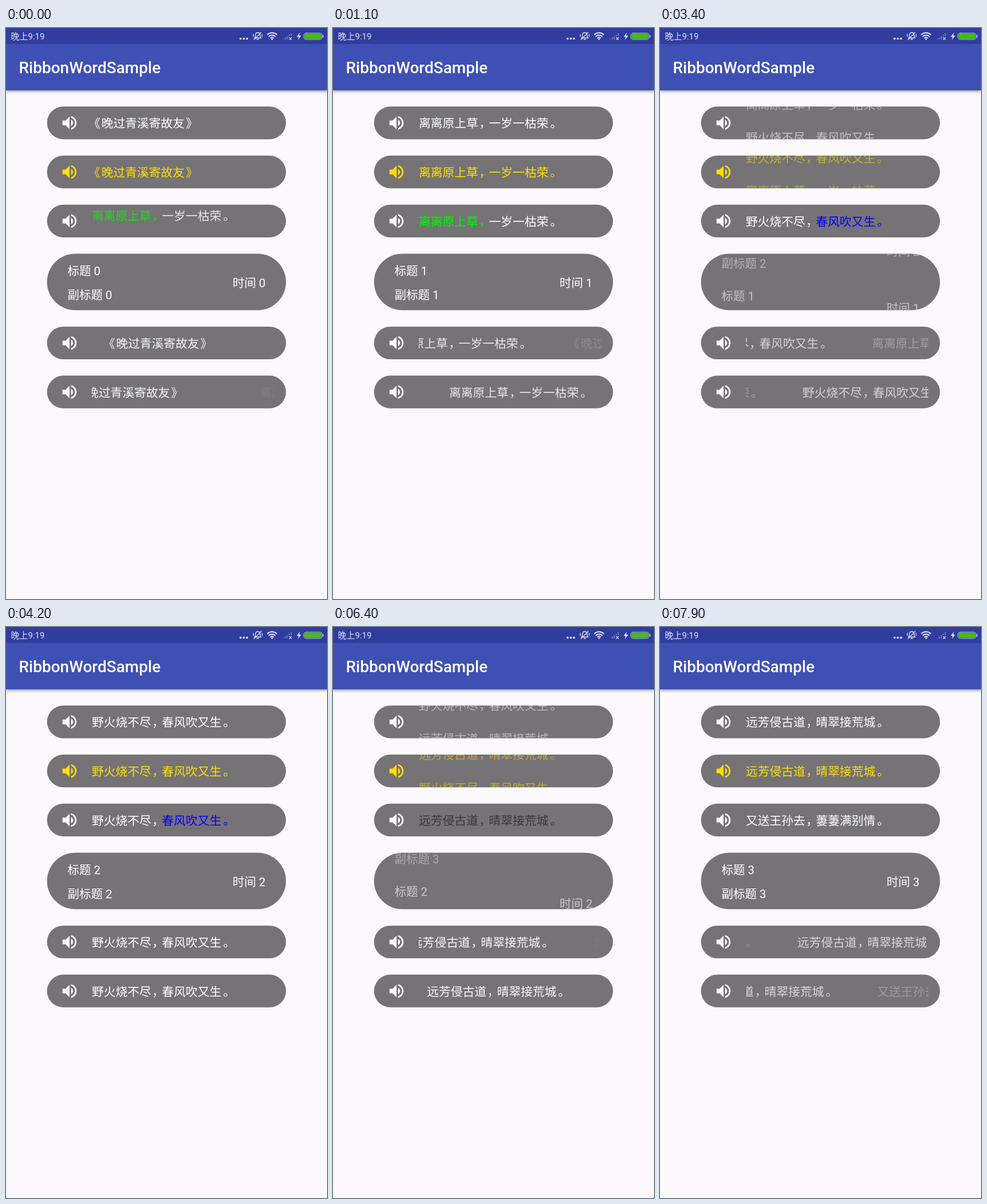
Recreate the animation shown at these times as an HTML page. Size 561x998 px, loop 8000 ms.

```html
<!DOCTYPE html>
<html lang="zh-CN">
<head>
<meta charset="utf-8">
<title>Ticker rows</title>
<style>
  html, body { margin: 0; width: 100%; height: 100%; overflow: hidden; background: #fbf9fc; }
  #stage { position: absolute; left: 0; top: 0; width: 561px; height: 998px; overflow: hidden; background: #fbf9fc; }
  #stage div, #stage svg { position: absolute; left: 0; top: 0; }
  #stage .bar { top: 28px; width: 561px; height: 80.6px; background: #3f50b4; box-shadow: 0 2px 5px rgba(0, 0, 0, .38); }
  #stage .status { width: 561px; height: 28px; background: #303c9e; }
  #stage .clock { left: 8.5px; font: 15px/31px Roboto, "Noto Sans CJK SC", "Noto Sans CJK", sans-serif; color: #dfe2f2; white-space: nowrap; }
  #stage .name { left: 22.5px; font: 500 28px/83px Roboto, sans-serif; color: #fff; white-space: nowrap; }
  #stage .view { overflow: hidden; left: 150px; width: 319px; }
  #stage .wide { left: 107.5px; width: 346px; }
  .item { width: 100%; height: 100%; white-space: nowrap;
    font: 20.78px/57px "Noto Sans CJK SC", "Noto Sans CJK JP", "Noto Sans CJK", sans-serif; }
  .wide .item { font: 20.5px/30px Roboto, "Noto Sans CJK SC", "Noto Sans CJK JP", "Noto Sans CJK", sans-serif; }
  #stage .wide .title { top: 15.3px; }
  #stage .wide .sub { top: 57.3px; }
  #stage .wide .time { top: 36.3px; left: auto; right: 0; }
  .item i { font-style: normal; position: relative; }
  .item .comma { left: 1.5px; margin-right: -2px; }
  .item .stop { left: 3px; }
  .item .open { margin-left: -4px; left: -2px; }
  .item .close { left: 2px; }
</style>
</head>
<body>
<div id="stage">
  <div class="bar"><div class="name">RibbonWordSample</div></div>
  <div class="status">
    <div class="clock">晚上9:19</div>
    <svg width="561" height="28" fill="none" stroke="#dfe2f2" stroke-linecap="round">
      <g fill="#dfe2f2" stroke="none">
        <circle cx="410" cy="18.6" r="1.9"/><circle cx="415.6" cy="18.6" r="1.9"/><circle cx="421.2" cy="18.6" r="1.9"/>
        <path d="M513.5 8l-5.5 7.5h3.6l-1.6 5.5 6-7.8h-3.7z"/>
      </g>
      <path d="M434.5 17.5q1.5-1.5 1.5-5 0-4.500 4-4.500t4 4.500q0 3.500 1.500 5zM438.500 20h3M433.500 20.500l12.500-13M432.300 11v4M447.500 11v4" stroke-width="1.3"/>
      <path d="M457 11.500a11.500 11.500 0 0 1 16 0M459.700 14.600a7.700 7.700 0 0 1 10.600 0M462.400 17.400a3.900 3.900 0 0 1 5.200 0" stroke-width="2"/>
      <circle cx="465" cy="19.700" r="1.400" fill="#dfe2f2" stroke="none"/>
      <path d="M484.500 20v-1M488 20v-3.500M491.500 20v-6M495 14.500v-3M498.500 14v-5" stroke-width="2" stroke-linecap="butt" opacity=".35"/>
      <path d="M495 16.300l4 4M499 16.300l-4 4" stroke-width="1.200"/>
      <g opacity=".8">
        <rect x="520.300" y="8.900" width="32.400" height="11.200" rx="4.500"/>
        <path d="M554.300 12.800v3.400" stroke-width="1.400"/>
      </g>
      <rect x="521.500" y="10.100" width="30" height="8.800" rx="3.400" fill="#44bd10" stroke="none"/>
    </svg>
  </div>
  <svg id="pills" width="561" height="998"></svg>
</div>
<script>
const LOOP = 8000, STEP = 100;
const stage = document.getElementById('stage');
const pills = document.getElementById('pills');

const HORN = 'M3 9v6h4l5 5V4L7 9H3zm13.5 3c0-1.77-1.02-3.29-2.5-4.03v8.05c1.48-.73 2.5-2.25 2.5-4.02z' +
  'M14 3.23v2.06c2.89.86 5 3.54 5 6.71s-2.11 5.85-5 6.71v2.06c4.01-.91 7-4.49 7-8.77s-2.99-7.86-7-8.77z';

const lines = [
  '《晚过青溪寄故友》',
  '离离原上草，一岁一枯荣。',
  '野火烧不尽，春风吹又生。',
  '远芳侵古道，晴翠接荒城。',
  '又送王孙去，萋萋满别情。'
];

// Nudge punctuation inside its full-width cell.
const marks = { '，': 'comma', '。': 'stop', '《': 'open', '》': 'close' };
const typeset = s => s.replace(/[，。《》]/g, c => `<i class="${marks[c]}">${c}</i>`);

const paint = (s, color) => `<span style="color:${color}">${typeset(s)}</span>`;
const plain = lines.map(typeset);
const tinted = [
  plain[0],
  paint(lines[1].slice(0, 6), '#00f800') + typeset(lines[1].slice(6)),
  typeset(lines[2].slice(0, 6)) + paint(lines[2].slice(6), '#0000f8'),
  paint(lines[3], '#38373a'),
  plain[4]
];
const cards = [0, 1, 2, 3].map(n =>
  `<div class="title">标题 ${n}</div><div class="sub">副标题 ${n}</div><div class="time">时间 ${n}</div>`);

// start: first switch, every: time between switches, last: length of a switch (ms)
const slow = { start: 114, every: 3018, last: 500 };
const card = { start: 151, every: 3018, last: 500 };
const quick = { start: -366, every: 2518, last: 500 };
const slide = { start: -366, every: 2518, last: 2000 };

const LOW = 57.2, TALL = 98.8, WIDE = 319.5;
const rows = [
  { top: 137.2, items: plain, dy: -LOW, beat: slow },
  { top: 223, items: plain, dy: LOW, beat: slow, color: '#ffdf00' },
  { top: 308.8, items: tinted, dy: LOW, beat: quick },
  { top: 394.5, items: cards, dy: TALL, beat: card, wide: true },
  { top: 521.9, items: plain, dx: WIDE, beat: slide },
  { top: 607.6, items: plain, dx: -WIDE, beat: slide }
];

function add(parent, cls, html = '') {
  const el = document.createElement('div');
  el.className = cls;
  el.innerHTML = html;
  return parent.appendChild(el);
}

for (const row of rows) {
  const color = row.color || '#fff';
  const height = row.wide ? TALL : LOW;
  pills.innerHTML += `<rect x="71.7" y="${row.top}" width="417.6" height="${height}" rx="${height / 2}" fill="#757376"/>`;
  if (!row.wide) {
    pills.innerHTML += `<path d="${HORN}" fill="${color}" transform="translate(94.7 ${row.top + 12.3}) scale(1.36)"/>`;
  }
  const view = add(stage, row.wide ? 'view wide' : 'view');
  view.style.cssText = `top:${row.top}px; height:${height}px; color:${color}`;
  row.els = row.items.map(html => add(view, 'item', html));
}

const ease = x => (1 - Math.cos(Math.PI * x)) / 2;

function place(row, el, shift, alpha) {
  el.style.visibility = alpha > 0 ? 'visible' : 'hidden';
  el.style.opacity = alpha;
  el.style.transform = `translate(${(row.dx || 0) * shift}px, ${(row.dy || 0) * shift}px)`;
}

function draw(t) {
  for (const row of rows) {
    const { start, every, last } = row.beat;
    const turn = Math.floor((t - start) / every);
    const p = turn < 0 ? 1 : ease(Math.min(1, (t - start - turn * every) / last));
    row.els.forEach((el, i) => {
      if (i === turn + 1) place(row, el, p - 1, p);
      else if (i === turn) place(row, el, p, 1 - p);
      else place(row, el, 0, 0);
    });
  }
}

const origin = performance.now();
function tick() {
  const t = (performance.now() - origin) % LOOP;
  draw(Math.floor(t / STEP) * STEP);
  requestAnimationFrame(tick);
}
tick();
</script>
</body>
</html>
```
